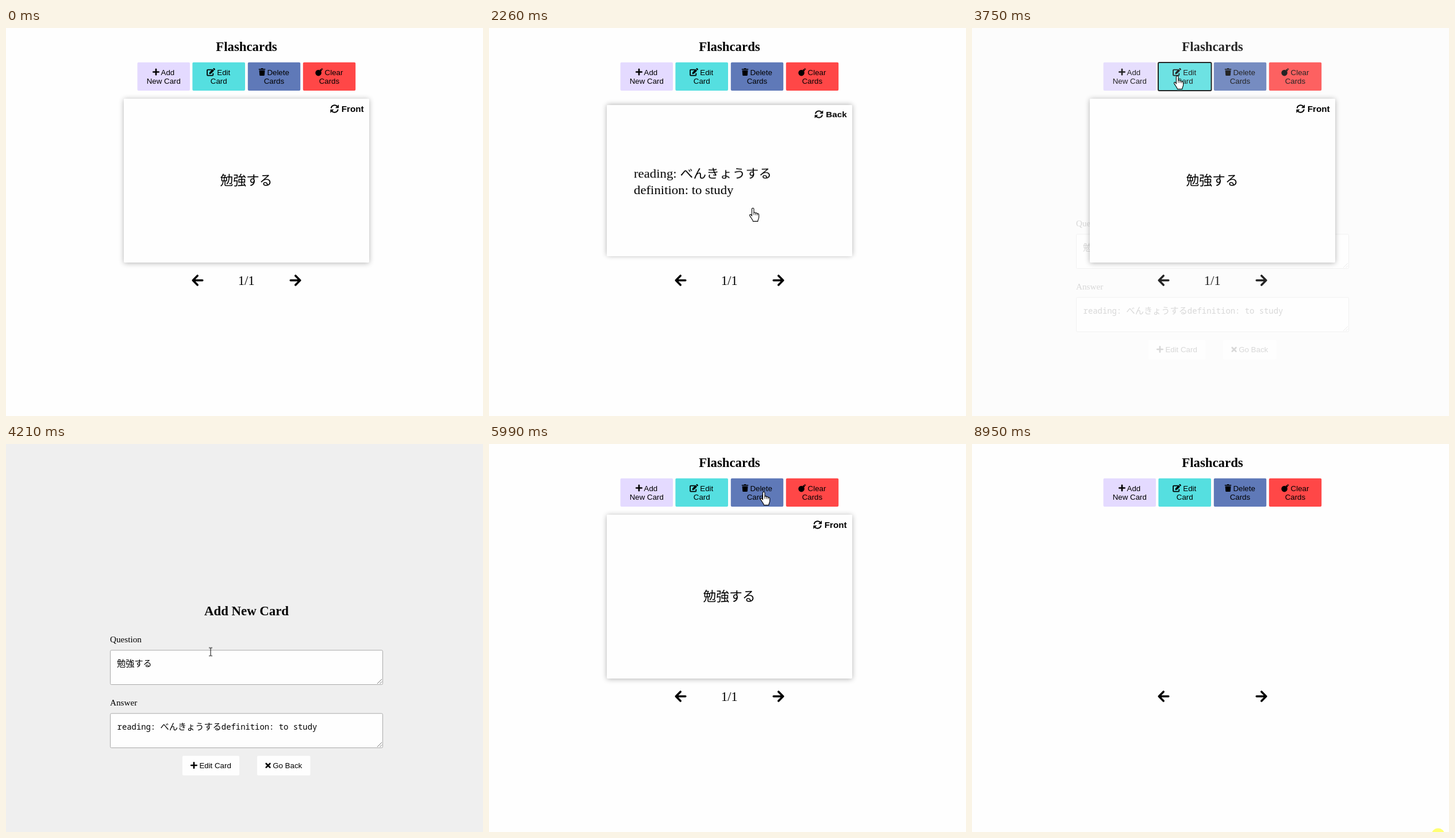
An HTML page for the animation above (9070 ms loop, 830 px wide and 675 px high).

```html
<!DOCTYPE html>
<html lang="en">
<head>
<meta charset="utf-8">
<title>Flashcards</title>
<style>
html, body { margin: 0; width: 100%; height: 100%; overflow: hidden; background: #fefefe; }
svg { display: block; }
.layer { position: absolute; left: 0; top: 0; width: 830px; height: 675px; }
text { font: 13.3px "Liberation Sans", Arial, sans-serif; white-space: pre; }
.mid { text-anchor: middle; }
.end { text-anchor: end; }
.serif { font: 22.8px "Liberation Serif", Times, serif; }
.head { font-weight: bold; }
.label { font: 15.2px "Liberation Serif", Times, serif; }
.side { font-size: 15.2px; font-weight: bold; }
.mono { font: 13.88px "Noto Sans Mono", "DejaVu Sans Mono", monospace; }
.jp { font: 300 22.8px "Noto Sans CJK JP", "Noto Sans CJK", sans-serif; }
.small { font-size: 15.2px; font-weight: 400; }
.line { fill: none; stroke: #000; }
.focus { fill: none; stroke: #000; stroke-width: 2; }
#card {
  position: absolute; z-index: 1; left: 205px; top: 123px; width: 427px; height: 285px;
  border-radius: 2px; box-shadow: 0 1px 9.5px rgba(0, 0, 0, .3); transform-style: preserve-3d;
}
.face { position: absolute; inset: 0; background: #fefefe; border-radius: 2px; backface-visibility: hidden; }
.back { transform: rotateX(180deg); }
#form { z-index: 0; opacity: 0; }
#form.above { z-index: 2; }
#pointer { z-index: 3; }
#cursor > g { display: none; }
#cursor[data-kind=arrow] .arrow, #cursor[data-kind=hand] .hand, #cursor[data-kind=beam] .beam { display: inline; }
.off { visibility: hidden; }
</style>
</head>
<body>
<svg class="layer" viewBox="0 0 830 675">
  <defs>
    <path id="plus" class="line" stroke-width="2.7" stroke-linecap="round" d="M-4.7 0H4.7M0-4.7V4.7"/>
    <path id="cross" class="line" stroke-width="2.7" stroke-linecap="round" d="M-3.3-3.3 3.3 3.3M3.3-3.3-3.3 3.3"/>
    <path id="left" class="line" stroke-width="3.6" stroke-linecap="round" stroke-linejoin="round" d="M8.3 0H-7.5M-.3-8-8.2 0-.3 8"/>
    <g id="sync">
      <path class="line" stroke-width="2" d="M-6-1A6.1 6.1 0 0 1 5-3.6M6 1A6.1 6.1 0 0 1-5 3.6"/>
      <path d="M7.3-7.2V-1.2H1.2ZM-7.3 7.2V1.2H-1.2Z"/>
    </g>
    <g id="pencil">
      <path class="line" stroke-width="1.8" stroke-linejoin="round" d="M2-4.4H-5.4Q-6.4-4.4-6.4-3.4V4.6Q-6.4 5.6-5.4 5.6H2.8Q3.8 5.6 3.8 4.6V1.5"/>
      <path d="M-3 3.2-2.6.2 3-5.4 5.6-2.8 0 2.8ZM3.6-6 4.6-7Q5.3-7.5 6-7L7.3-5.6Q7.8-5 7.3-4.4L6.2-3.4Z"/>
    </g>
    <path id="trash" d="M-5.7-5.6H-2L-1.4-6.6H1.4L2-5.6H5.7V-3.9H-5.7ZM-4.9-3H4.9L4.3 5.4Q4.2 6.5 3.1 6.5H-3.1Q-4.2 6.5-4.3 5.4Z"/>
    <g id="bomb">
      <circle cx="-1.2" cy="1.3" r="5.3"/>
      <path d="M1-4 2.6-5.4 5-3 3.6-1.2Z"/>
      <path class="line" stroke-width="1.2" d="M3.7-4 5-5.3M4.6-6.8 5-5.3 6.6-5"/>
    </g>
  </defs>

  <text class="serif head mid" x="418.5" y="40">Flashcards</text>

  <rect x="228.6" y="59.7" width="91.4" height="49.4" rx="2" fill="#e4daff"/>
  <use href="#plus" x="261" y="76.5"/>
  <text x="269.6" y="81.5">Add</text><text class="mid" x="274.3" y="96.8">New Card</text>

  <rect x="324.4" y="59.7" width="91.6" height="49.4" rx="2" fill="#55dfe0"/>
  <use href="#pencil" x="356.5" y="77"/>
  <text x="367.3" y="81.5">Edit</text><text class="mid" x="370.2" y="96.8">Card</text>

  <rect x="420.8" y="59.7" width="91.4" height="49.4" rx="2" fill="#5f79b8"/>
  <use href="#trash" x="445.5" y="76.5"/>
  <text x="454.4" y="81.5">Delete</text><text class="mid" x="466.4" y="96.8">Cards</text>

  <rect x="516.8" y="59.7" width="91.4" height="49.4" rx="2" fill="#ff4747"/>
  <use href="#bomb" x="544.8" y="76.8"/>
  <text x="554.6" y="81.5">Clear</text><text class="mid" x="562.4" y="96.8">Cards</text>

  <rect id="editFocus" class="focus" x="324" y="60" width="92.5" height="49" rx="2"/>
  <rect id="deleteFocus" class="focus" x="421" y="60" width="91.5" height="49" rx="2"/>

  <use href="#left" x="333.5" y="439"/>
  <text id="count" class="serif mid" x="418.2" y="446.5">1/1</text>
  <use href="#left" transform="translate(503.5 439) scale(-1 1)"/>
</svg>

<div id="card">
  <svg class="face" viewBox="205 123 427 285" width="427" height="285">
    <use href="#sync" x="571.7" y="140.5"/>
    <text class="side end" x="622.6" y="146">Front</text>
    <text class="jp mid" x="418" y="272.5">勉強する</text>
  </svg>
  <svg class="face back" viewBox="205 123 427 285" width="427" height="285">
    <use href="#sync" x="574" y="140.5"/>
    <text class="side end" x="622.6" y="146">Back</text>
    <text class="serif" x="252" y="260.5">reading: <tspan class="jp">べんきょうする</tspan></text>
    <text class="serif" x="252" y="291">definition: to study</text>
  </svg>
</div>

<svg id="form" class="layer" viewBox="0 0 830 675">
  <rect width="830" height="675" fill="#efefef"/>
  <text class="serif head mid" x="418.5" y="298">Add New Card</text>
  <text class="label" x="181" y="345">Question</text>
  <text class="label" x="181" y="455">Answer</text>
  <g fill="#fefefe">
    <g stroke="#a9a9a9">
      <rect x="181.5" y="358.8" width="474" height="59.7" rx="2"/>
      <rect x="181.5" y="468.8" width="474" height="59.7" rx="2"/>
      <path stroke="#777" d="M646 417 654 409M650.5 417 654 413.5M646 527 654 519M650.5 527 654 523.5"/>
    </g>
    <rect x="307" y="542.5" width="99" height="34" rx="2"/>
    <rect x="437" y="542.5" width="92.5" height="34" rx="2"/>
  </g>
  <text class="jp small" x="193" y="387">勉強する</text>
  <text class="mono" x="193.6" y="497">reading: <tspan class="jp small">べんきょうする</tspan>definition: to study</text>
  <use href="#plus" x="327" y="559"/>
  <text x="336.4" y="564">Edit Card</text>
  <use href="#cross" x="456" y="559.3"/>
  <text x="464.2" y="564">Go Back</text>
  <rect id="backFocus" class="focus" x="437" y="542.5" width="92.5" height="34" rx="2"/>
</svg>

<svg id="pointer" class="layer" viewBox="0 0 830 675">
  <circle id="click" r="11.5" fill="#ff0" fill-opacity=".55"/>
  <g id="cursor" fill="#fff" stroke="#000" stroke-linejoin="round">
    <g class="arrow"><path d="M.5 .5V16.5L4.2 13 6.6 18.6 9 17.6 6.7 12H11.7Z"/></g>
    <g class="hand">
      <path stroke-width="1.1" d="M-1.6 13V1A1.75 1.75 0 0 1 1.9 1V7.3Q3.5 6 5 8Q6.8 6.9 7.9 9Q10.6 8.4 10.6 11.2V15.2C10.6 18 9 18.6 8.7 22.4H.4C.2 19.5-2.2 18-3.3 15.6L-5.2 12.6C-6.2 10.6-3.8 9.6-2.7 11.3Z"/>
      <path fill="none" stroke-width=".9" d="M1.9 7V11.3M5 8V11.6M7.9 9V12"/>
    </g>
    <g class="beam"><path fill="none" d="M-3-7H-1Q0-7 0-6Q0-7 1-7H3M0-6V6M-3 7H-1Q0 7 0 6Q0 7 1 7H3"/></g>
  </g>
</svg>

<script>
const LOOP = 9070;
const $ = id => document.getElementById(id);

// Screen updates in ms: first, last, number of updates
const updates = [
  [130, 300, 3], [530, 770, 4], [1080, 1160, 2], [1480], [1860, 2490, 9], [2810],
  [2960, 3600, 9], [3750, 4590, 12], [5060, 5220, 2], [5290, 5930, 10], [5990],
  [7690], [7850, 7930, 2], [8390, 8950, 8]
];

// Click marks: time, x, y
const clicks = [
  [130, 787, 675.5], [1930, 459, 314], [2810, 442, 268.5], [3600, 357, 84],
  [5060, 485, 560], [7690, 477.5, 84], [8950, 811, 680]
];

const kinds = [
  [0, 'none'], [530, 'arrow'], [760, 'beam'], [1080, 'arrow'], [1850, 'hand'], [3900, 'arrow'],
  [4190, 'beam'], [4580, 'hand'], [5440, 'arrow'], [5620, 'hand'], [8380, 'arrow']
];

function track(el, prop, keys) {
  const all = [[0, keys[0][1]], ...keys, [LOOP, keys.at(-1)[1]]];
  const animation = el.animate(
    all.map(([ms, value, easing = 'linear']) => ({ offset: ms / LOOP, [prop]: value, easing })),
    { duration: LOOP, fill: 'both' });
  animation.pause();
  return animation;
}

const to = (x, y) => `translate(${x}px, ${y}px)`;
const turn = deg => `rotateX(${deg}deg)`;
const glide = 'ease-in-out';

const tracks = [
  track($('cursor'), 'transform', [
    [450, to(787, 676), glide], [770, to(541.5, 487.5)],
    [1000, to(541.5, 487.5), glide], [1160, to(515, 429.5)],
    [1470, to(515, 429.5)], [1480, to(513.5, 429)],
    [1780, to(513.5, 429), glide], [1860, to(459, 314)],
    [2330, to(459, 314), glide], [2490, to(443, 269)],
    [3200, to(443, 269), glide], [3600, to(357, 84)],
    [3900, to(357, 84), glide], [4205, to(356, 361.5), glide], [4590, to(485, 560)],
    [5360, to(485, 560), glide], [5930, to(478, 88)], [5990, to(478, 84)],
    [8310, to(478, 84), glide], [8950, to(811, 680)]
  ]),
  track($('card'), 'transform', [
    [2020, turn(0), 'ease'], [2420, turn(180)], [2885, turn(180), 'ease'], [3285, turn(0)]
  ]),
  track($('form'), 'opacity', [
    [3710, 0, 'ease'], [4010, 1], [5115, 1, 'ease'], [5415, 0]
  ])
];

function lastUpdate(t) {
  let shown = 0;
  for (const [first, last = first, count = 1] of updates) {
    if (t < first) break;
    const gap = (last - first) / (count - 1) || 1;
    shown = first + gap * Math.min(count - 1, Math.floor((t - first) / gap + 1e-6));
  }
  return shown;
}

const latest = (list, t) => list.findLast(([ms]) => ms <= t);
const show = (id, on) => $(id).classList.toggle('off', !on);

function render(t) {
  const within = (a, b) => t >= a && t < b;
  for (const animation of tracks) animation.currentTime = t;

  $('cursor').dataset.kind = latest(kinds, t)[1];
  const [start, x, y] = latest(clicks, t) || [-1000, 0, 0];
  $('click').setAttribute('transform', `translate(${x} ${y})`);
  $('click').style.opacity = Math.max(0, 1 - (t - start) / 150);

  $('form').classList.toggle('above', within(3780, 5260));
  show('editFocus', within(3590, 5060));
  show('backFocus', within(5060, 7690));
  show('deleteFocus', within(7690, 7850));
  show('count', t < 7850);
  $('card').style.display = t < 7850 ? '' : 'none';
}

function tick() {
  render(lastUpdate(performance.now() % LOOP));
  requestAnimationFrame(tick);
}
tick();
</script>
</body>
</html>
```
